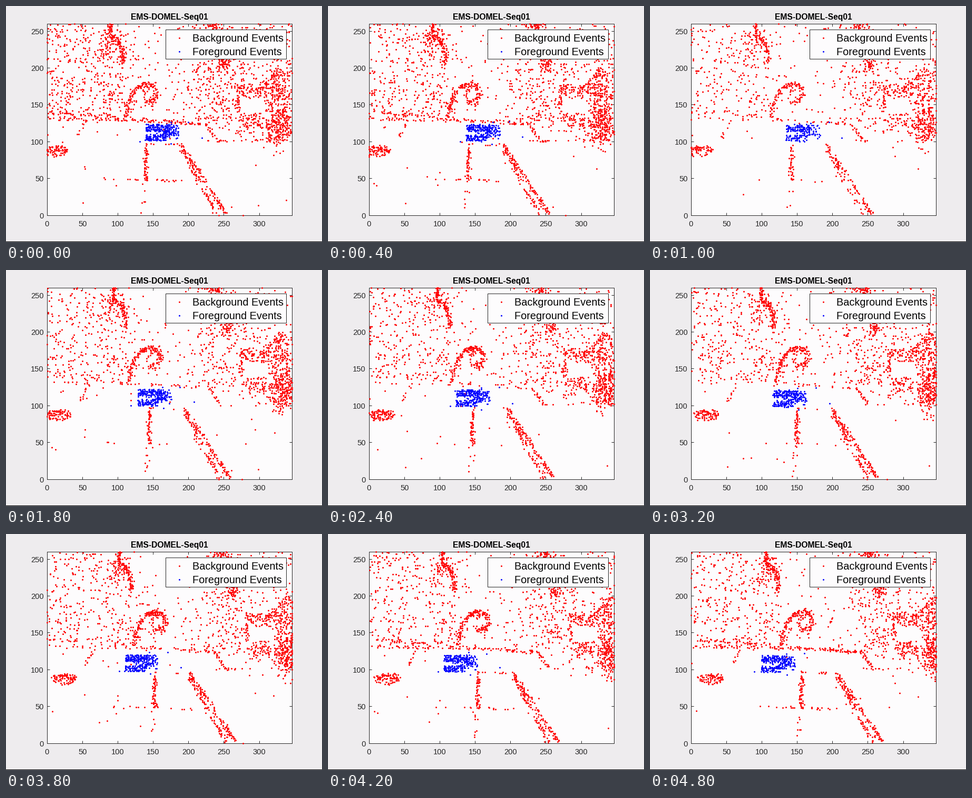
A matplotlib script for the animation above (5000 ms loop, 600 px wide and 451 px high).

```python
import numpy as np
import matplotlib.pyplot as plt
from matplotlib.animation import FuncAnimation
from matplotlib.patches import Rectangle

W, H, DPI = 600, 451, 64
FRAMES, INTERVAL = 25, 200
SENSOR = np.array([346, 260])
LEFT, RIGHT, TOP, BOTTOM = 77.5, 542.5, 33.5, 399.5
INK, PAPER, RED, BLUE = "#262626", "#fdfcfd", "#ff0000", "#0000ff"

rng = np.random.default_rng(7)


def px(size):
    """Pixels to points."""
    return size * 72 / DPI


def box(n, x0, x1, y0, y1):
    return np.column_stack([rng.uniform(x0, x1, n), rng.uniform(y0, y1, n)])


def blob(n, cx, cy, sx, sy):
    return rng.normal((cx, cy), (sx, sy), (n, 2))


def line(n, start, end, spread=1.0):
    along = rng.uniform(0, 1, (n, 1))
    points = np.array(start) + along * np.subtract(end, start)
    return points + rng.normal(0, spread, (n, 2))


def arc(n, cx, cy, rx, ry, turn0=0.0, turn1=1.0, spread=1.2):
    a = 2 * np.pi * rng.uniform(turn0, turn1, n)
    curve = np.column_stack([cx + rx * np.cos(a), cy + ry * np.sin(a)])
    return curve + rng.normal(0, spread, (n, 2))


def foliage(n):
    """Dots above the horizon, thin around the open middle and the walls."""
    p = box(n, -17, SENSOR[0], 100, SENSOR[1])
    x, y = p.T
    horizon = np.maximum(138 - 0.06 * x - 0.27 * np.maximum(0, x - 226), 102)
    density = 1 - 0.8 * np.exp(-((x - 155) / 42) ** 4)
    wall = (abs(x - 288) < 18) & (abs(y - 150) < 12)
    return p[(y > horizon) & ~wall & (rng.random(n) < density)]


def buildings():
    yield "edge", line(60, (299, 168), (327, 199), 2.5)
    yield "edge", line(35, (270, 175), (271, 138))
    for x in (318, 326, 334):
        yield "edge", line(60, (x, 104), (x + 1, 195), 1.5)
    for y in (129, 168):
        yield "edge", box(70, 271, 304, y - 9, y + 9)
    yield "edge", box(150, 308, 346, 104, 196)
    yield "edge", blob(200, 328, 122, 9, 13)
    yield "noise", line(30, (318, 104), (330, 80), 2.5)


def trees():
    yield "texture", foliage(2350)
    yield "texture", blob(80, 88, 238, 9, 12)
    yield "texture", blob(110, 236, 200, 16, 30)
    yield "edge", line(45, (90, 244), (90, 260), 1.4)
    yield "edge", arc(120, 88, 214, 19, 28, -0.04, 0.25, 2)
    yield "edge", arc(125, 146, 132, 35, 48, 0.25, 0.5, 1.5)
    yield "edge", arc(115, 146, 165, 9, 12, spread=2.2)
    yield "edge", blob(55, 236, 257, 7, 3)
    yield "edge", blob(60, 250, 207, 4, 4)


def ground():
    for y in (141, 133):
        yield "flat", line(90, (-17, y), (165, 127), 1.2)
    yield "flat", line(60, (165, 128), (226, 123))
    yield "edge", line(28, (224, 125), (240, 102), 1.3)
    yield "flat", line(24, (225, 101), (320, 101), 0.6)
    yield "noise", line(35, (40, 104), (55, 130))
    yield "edge", box(60, -3, 27, 79, 94)
    yield "edge", arc(70, 12, 86, 14, 6, 0, 0.5, 1.8)


def road():
    yield "edge", line(75, (139.5, 48), (140, 96), 1.4)
    yield "noise", line(20, (136, 4), (139, 48), 2.5)
    yield "edge", line(130, (188, 98), (254, 1), 1.3)
    yield "edge", line(90, (188, 92), (240, 1), 1.8)
    yield "noise", line(55, (191, 88), (246, 3), 4)
    yield "flat", line(30, (80, 50), (200, 46), 0.8)
    yield "flat", line(14, (145, 96), (190, 95), 0.7)


SCENE = [*trees(), *buildings(), *ground(), *road()]
STRAYS = box(55, 0, SENSOR[0], 0, 128)

# Relative to the rear top corner of the car.
CAR = np.vstack([
    box(145, 0, 33, -9, 0),
    box(110, 0, 29, -22, -14),
    blob(75, 38, -9, 6, 5),
    box(15, 12, 34, -14, -9),
    blob(12, 28, -11, 18, 8),
])


def rates(t):
    """Share of dots that fire; the camera is nearly still at about 1.1 s."""
    lull = np.exp(-((t - 1.1) / 0.5) ** 2)
    sway = np.cos(np.pi * t / 5) ** 4
    return {
        "texture": 0.46 + 0.18 * np.exp(-2 * t) - 0.08 * lull,
        "edge": 0.72 - 0.2 * lull,
        "flat": 0.16 + 0.55 * sway * (1 - lull),
        "noise": 0.32 - 0.1 * lull,
        "car": 0.84 - 0.3 * lull,
    }


def visible(points):
    points = np.unique(np.rint(points), axis=0)
    inside = (points >= 0) & (points <= SENSOR)
    return points[inside.all(axis=1)].T


def events(frame):
    t = frame * INTERVAL / 1000
    ease = (t / 4.8) ** 1.3
    rate = rates(t)
    noise = np.random.default_rng(1000 + frame)

    def fire(kind, points):
        kept = points[noise.random(len(points)) < rate[kind]]
        return kept + noise.normal(0, 0.5, kept.shape)

    pan = [16.5 * ease, 0]
    back = [fire(kind, points + pan) for kind, points in SCENE]
    back.append(fire("noise", STRAYS))
    corner = [140 - 40 * ease, 123 - 4.5 * ease]
    return visible(np.vstack(back)), visible(fire("car", CAR + corner))


fig = plt.figure(figsize=(W / DPI, H / DPI), dpi=DPI, facecolor="#eeecee")
ax = fig.add_axes([LEFT / W, 1 - BOTTOM / H, (RIGHT - LEFT) / W,
                   (BOTTOM - TOP) / H], facecolor=PAPER)
ax.set(xlim=(0, SENSOR[0]), ylim=(0, SENSOR[1]),
       xticks=range(0, 301, 50), yticks=range(0, 251, 50))
ax.tick_params(direction="in", top=True, right=True, length=px(4.6),
               width=px(1), color=INK, labelbottom=False, labelleft=False)
for spine in ax.spines.values():
    spine.set(linewidth=px(1), color=INK)


def text(x, y, s, size, color="black", **style):
    fig.text(x / W, 1 - y / H, s, fontsize=px(size), color=color,
             family="Liberation Sans", va="baseline", **style)


def rect(x, y, w, h, **style):
    fig.add_artist(Rectangle((x / W, 1 - (y + h) / H), w / W, h / H,
                             transform=fig.transFigure, **style))


dot = dict(linestyle="none", marker="o", markersize=px(3), markeredgewidth=0)
red, = ax.plot([], [], color=RED, clip_on=False, zorder=3, **dot)
blue, = ax.plot([], [], color=BLUE, clip_on=False, zorder=4, **dot)

for v in ax.get_xticks():
    x = LEFT + v * (RIGHT - LEFT) / SENSOR[0]
    text(x + 0.5, 421, f"{v:.0f}", 14.6, INK, ha="center")
for v in ax.get_yticks():
    y = BOTTOM - v * (BOTTOM - TOP) / SENSOR[1]
    text(71.5, y + 6, f"{v:.0f}", 14.6, INK, ha="right")
text(310.5, 26, "EMS-DOMEL-Seq01", 15.65, weight="bold", ha="center")

rect(303, 44.5, 228.5, 56, facecolor=PAPER, edgecolor=INK, linewidth=px(1))
for y, name, color in [(61, "Background Events", RED),
                       (87, "Foreground Events", BLUE)]:
    fig.add_artist(plt.Line2D([328.5 / W], [1 - y / H], color=color,
                              transform=fig.transFigure, **dot))
    text(354, y + 7, name, 19.9)
rect(0, 450, W, 1, facecolor="black", linewidth=0)


def draw(frame):
    back, car = events(frame)
    red.set_data(*back)
    blue.set_data(*car)
    return red, blue


anim = FuncAnimation(fig, draw, frames=FRAMES, interval=INTERVAL,
                     repeat=True, repeat_delay=0)
plt.show()
```
